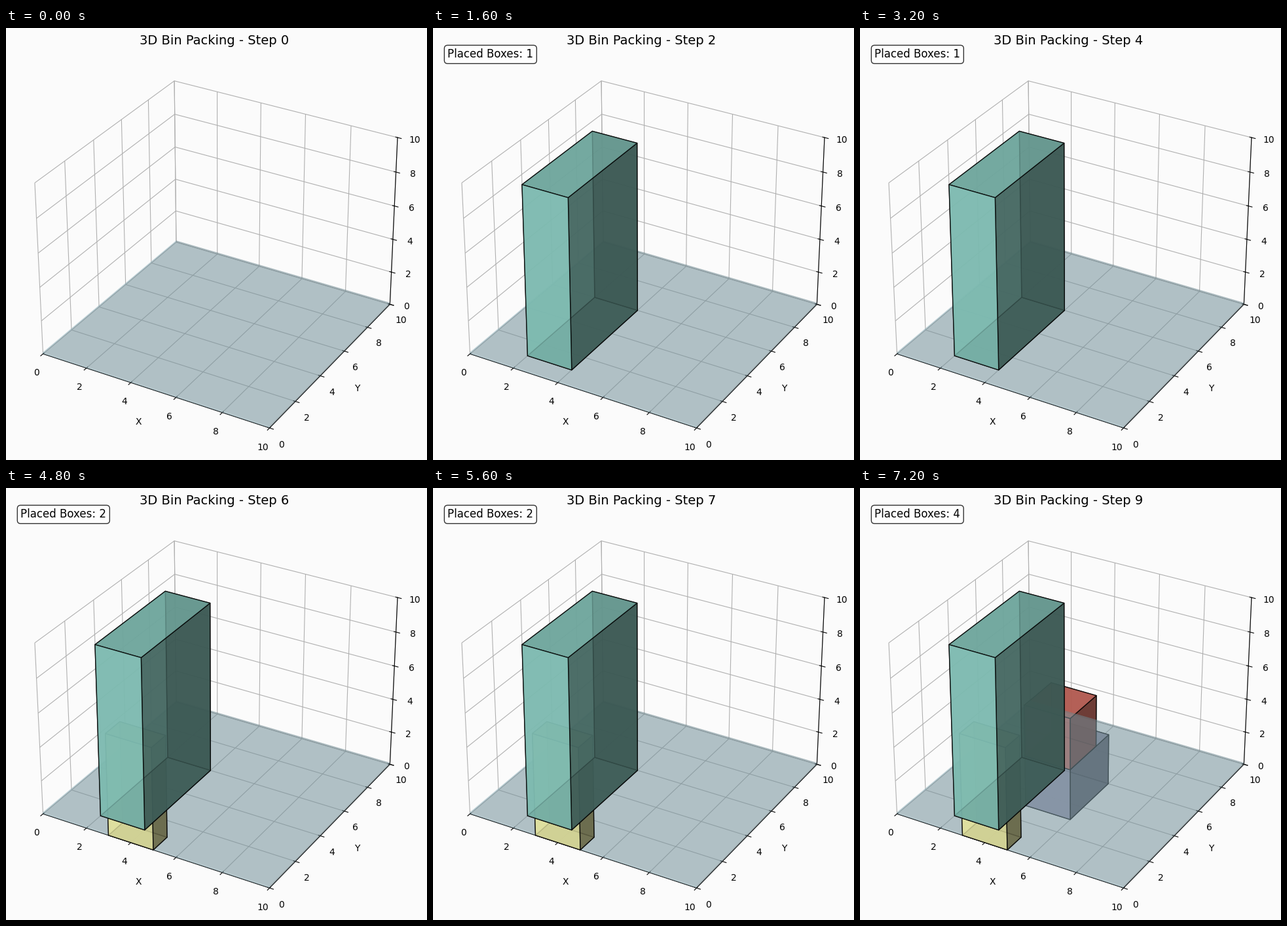
Recreate the animation shown at these times as a matplotlib script. Size 643x659 px, loop 8 s.

```python
import matplotlib.pyplot as plt
from matplotlib.animation import FuncAnimation

W, H, DPI = 643, 659, 100
SIDE, PAD = 616, 10
BACKGROUND = "#fbfbfb"
STEPS = 10
BIN = 10
BOX_WIDTH = 2

# step placed, x, y, depth, height
DROPS = [(2, 2, 1, 5, 10), (5, 3, 0, 1, 6), (8, 4, 3, 3, 3), (9, 4, 3, 2, 3)]


def resting_height(drop, earlier):
    """Top of the highest earlier box under this box's footprint."""
    _, x, y, depth, _ = drop
    level = 0
    for other in earlier:
        _, ox, oy, odepth, oheight = other
        overlaps = (abs(x - ox) < BOX_WIDTH
                    and y < oy + odepth and oy < y + depth)
        if overlaps:
            below = earlier[:earlier.index(other)]
            level = max(level, resting_height(other, below) + oheight)
    return level


def draw_box(i):
    _, x, y, depth, height = DROPS[i]
    z = resting_height(DROPS[i], DROPS[:i])
    return ax.bar3d(x, y, z, BOX_WIDTH, depth, height,
                    color=plt.cm.Set3(i), alpha=0.8, edgecolor="black")


fig = plt.figure(figsize=(W / DPI, H / DPI), dpi=DPI, facecolor=BACKGROUND)
ax = fig.add_axes([PAD / W, PAD / H, SIDE / W, SIDE / H], projection="3d")
ax.set_facecolor(BACKGROUND)
ax.view_init(elev=30, azim=-60)

# Thin floor slab of the bin
ax.bar3d(0, 0, 0, BIN, BIN, 0.1, color="lightblue", alpha=0.33)
boxes = [draw_box(i) for i in range(len(DROPS))]

limits = (0, BIN)
ax.set(xlim=limits, ylim=limits, zlim=limits, xlabel="X", ylabel="Y")
for axis in (ax.xaxis, ax.yaxis, ax.zaxis):
    axis.set_pane_color((1, 1, 1, 0))

title = ax.set_title("", fontsize=14)
counter = ax.text2D(
    0.02, 0.98, "", transform=ax.transAxes, fontsize=12,
    bbox=dict(boxstyle="round", facecolor="white", alpha=0.8),
)


def update(step):
    placed = sum(step >= drop[0] for drop in DROPS)
    for i, box in enumerate(boxes):
        box.set_visible(i < placed)
    title.set_text(f"3D Bin Packing - Step {step}")
    counter.set_text(f"Placed Boxes: {placed}")
    counter.set_visible(placed > 0)
    return [title, counter, *boxes]


anim = FuncAnimation(fig, update, frames=STEPS, interval=800,
                     repeat=True, repeat_delay=0, blit=False)
plt.show()
```
